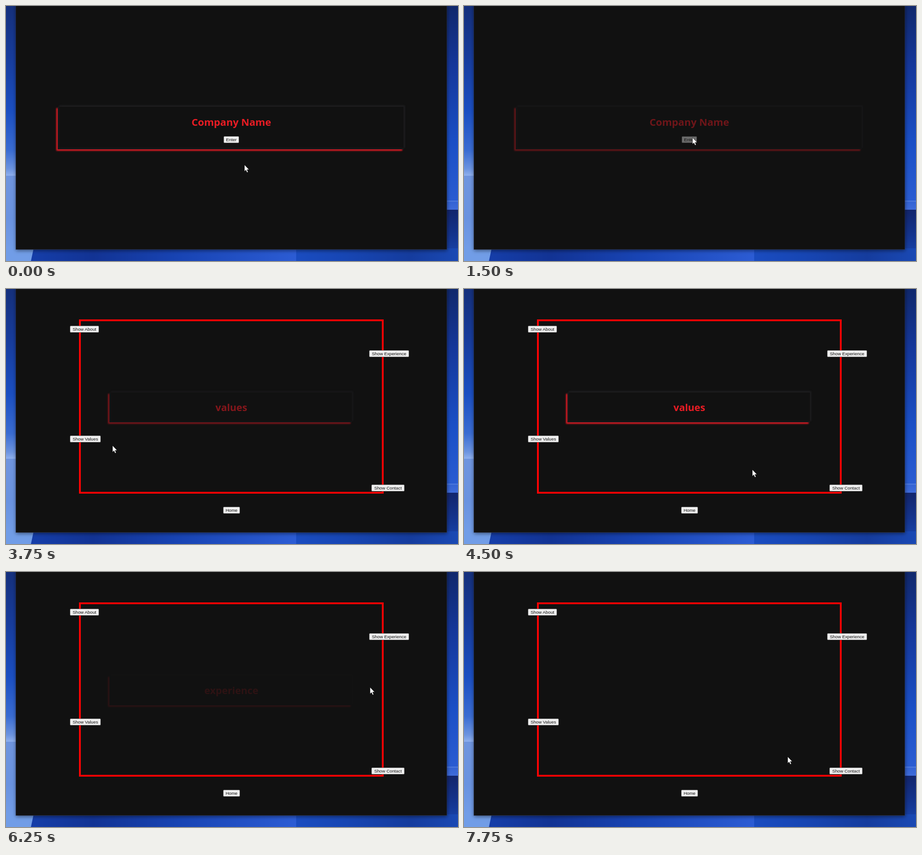
An HTML page with a canvas for the animation above (8 s loop, 997x562 px).

```html
<!DOCTYPE html>
<html lang="en">
<head>
<meta charset="utf-8">
<title>Company page</title>
<style>
  html, body { margin: 0; width: 100%; height: 100%; overflow: hidden; background: #111; }
  #stage { position: relative; width: 997px; height: 562px; overflow: hidden; }
  #stage > * { position: absolute; }
  #desk, #arrow { left: 0; top: 0; }
  #menu { left: 0; top: 0; width: 997px; height: 562px; }
  .frame { position: absolute; left: 161px; top: 67px; width: 664px; height: 376px; border: 4px solid #fb0203; }
  .card {
    box-shadow: -3px 3px 3px #e41b24, 3px -3px 3px #1e1e20, inset 3px -3px 3px #1a1a1c;
  }
  .card h1 {
    position: absolute; left: 0; right: 0; margin: 0; text-align: center; color: #e81c24;
    font: 700 22.1px/30px "Open Sans", "Noto Sans", sans-serif;
  }
  .intro { left: 114px; top: 222px; width: 763px; height: 94px; }
  .intro h1 { top: 18px; left: 3px; }
  .item { left: 228px; top: 228px; width: 535px; height: 66px; }
  .item h1 { top: 18px; left: 3px; font-size: 21.7px; }
  .btn {
    position: absolute; box-sizing: border-box; height: 15px; border: 1px solid #858585; border-radius: 2px;
    background: #efefef; color: #111; text-align: center; white-space: nowrap;
    font: 9.75px/13px "Liberation Sans", Arial, sans-serif;
  }
  .btn.over { background: #e2e2e2; border-color: #5a5a5a; }
</style>
</head>
<body>
<div id="stage">
  <canvas id="desk" width="997" height="562"></canvas>
  <div id="menu"><div class="frame"></div></div>
  <div id="intro" class="card intro"><h1>Company Name</h1></div>
  <div id="values" class="card item"><h1>values</h1></div>
  <div id="experience" class="card item"><h1>experience</h1></div>
  <svg id="arrow" width="14" height="20" viewBox="-1 -1 14 20">
    <path d="M0 0V14.6L3.2 11.6L5.6 16.9L8 15.9L5.7 10.7H10.2Z" fill="#fff" stroke="#000" stroke-width=".6"/>
  </svg>
</div>
<script>
const LOOP = 8000, STEP = 250;
const $ = id => document.getElementById(id);
const menu = $('menu'), intro = $('intro'), arrow = $('arrow');

// Desktop wallpaper and the dark window
const g = $('desk').getContext('2d');

function grad(x, y, w, h, stops, across) {
  const f = across ? g.createLinearGradient(x, 0, x + w, 0) : g.createLinearGradient(0, y, 0, y + h);
  stops.forEach(([p, c]) => f.addColorStop(p, c));
  g.fillStyle = f;
  g.fillRect(x, y, w, h);
}

function drawDesk() {
  grad(0, 0, 24, 374, [[0, '#15307c'], [.3, '#173c9c'], [.62, '#1b4fc2'], [.85, '#3a6cd2'], [.96, '#6c94e0'], [1, '#8fb0ee']]);
  grad(0, 374, 24, 188, [[0, '#6f95de'], [.5, '#6a93e0'], [1, '#75a1ea']]);
  grad(970, 0, 27, 430, [[0, '#10286c'], [.3, '#15379a'], [.7, '#1a4fc6'], [1, '#2a5cd2']]);
  grad(970, 429, 27, 20, [[0, '#5c86e2'], [.15, '#3463d4'], [1, '#3f6cda']]);
  grad(970, 449, 27, 113, [[0, '#12256c'], [.5, '#14348e'], [1, '#1a49b4']]);
  grad(0, 534, 640, 28, [[0, '#10309a'], [.1, '#153da8'], [.3, '#123394'], [.6, '#1844b4'], [1, '#2c5cd4']], true);
  grad(640, 534, 357, 28, [[0, '#1a4cc0'], [.3, '#1746b4'], [.7, '#153c9e'], [1, '#1a49b4']], true);
  g.fillStyle = '#719de7';
  g.beginPath();
  g.moveTo(0, 534); g.lineTo(61, 534); g.lineTo(55, 562); g.lineTo(0, 562);
  g.fill();

  g.save();
  g.shadowColor = 'rgba(0,0,0,.5)';
  g.shadowBlur = 8;
  g.shadowOffsetY = 2;
  g.fillStyle = '#2c3040';
  g.fillRect(21.5, -10, 951, 547);
  g.restore();
  g.fillStyle = '#111';
  g.fillRect(22, 0, 950, 536);
}

// Buttons
function button(label, x, y, w, parent, ox = 0, oy = 0) {
  const el = document.createElement('div');
  el.className = 'btn';
  el.textContent = label;
  el.style.cssText = `left:${x - ox}px;top:${y - oy}px;width:${w}px`;
  parent.append(el);
  return { el, x, y, w };
}

const buttons = [
  button('Enter', 480, 287, 34, intro, 114, 222),
  button('Show About', 141, 81, 64, menu),
  button('Show Experience', 801, 135, 88, menu),
  button('Show Values', 141, 323, 68, menu),
  button('Show Contact', 806, 431, 73, menu),
  button('Home', 479, 480, 37, menu)
];

// Pointer path: time, x, y
const path = [
  [0, 526, 350], [250, 513, 318], [500, 504, 290], [1750, 504, 290], [2000, 470, 400],
  [2250, 416, 507], [2500, 185, 59], [2750, 838, 141], [3000, 470, 300], [3250, 190, 329],
  [3500, 190, 329], [3750, 235, 345], [4000, 380, 392], [4500, 636, 398], [4750, 710, 300],
  [5000, 790, 185], [5250, 838, 130], [5500, 826, 140], [6000, 826, 140], [6250, 803, 254],
  [6500, 765, 335], [6750, 724, 380], [7000, 716, 388], [7500, 716, 388], [7750, 714, 407]
];

function pointer(t) {
  const i = path.findIndex(p => p[0] > t);
  if (i < 0) return path[path.length - 1].slice(1);
  const [a, ax, ay] = path[i - 1], [b, bx, by] = path[i];
  const k = (t - a) / (b - a);
  return [ax + (bx - ax) * k, ay + (by - ay) * k];
}

const swing = (t, start, span) =>
  .5 - Math.cos(Math.PI * Math.min(1, Math.max(0, (t - start) / span))) / 2;

const fade = (t, start, end) => swing(t, start, 1000) * (1 - swing(t, end, 400));

function draw(now) {
  const t = Math.floor((now % LOOP) / STEP) * STEP;
  const [x, y] = pointer(t);
  const inMenu = t >= 2000;
  arrow.style.transform = `translate(${x - 1}px,${y - 1}px)`;
  menu.style.visibility = inMenu ? 'visible' : 'hidden';
  intro.style.opacity = inMenu ? 0 : 1 - swing(t, 955, 1000);
  $('values').style.opacity = fade(t, 3230, 4550);
  $('experience').style.opacity = fade(t, 6015, 7300);
  for (const b of buttons) {
    const over = x >= b.x && x < b.x + b.w && y >= b.y && y < b.y + 15;
    b.el.classList.toggle('over', over);
  }
}

drawDesk();
const begin = performance.now();
function tick() {
  draw(performance.now() - begin);
  requestAnimationFrame(tick);
}
tick();
</script>
</body>
</html>
```
